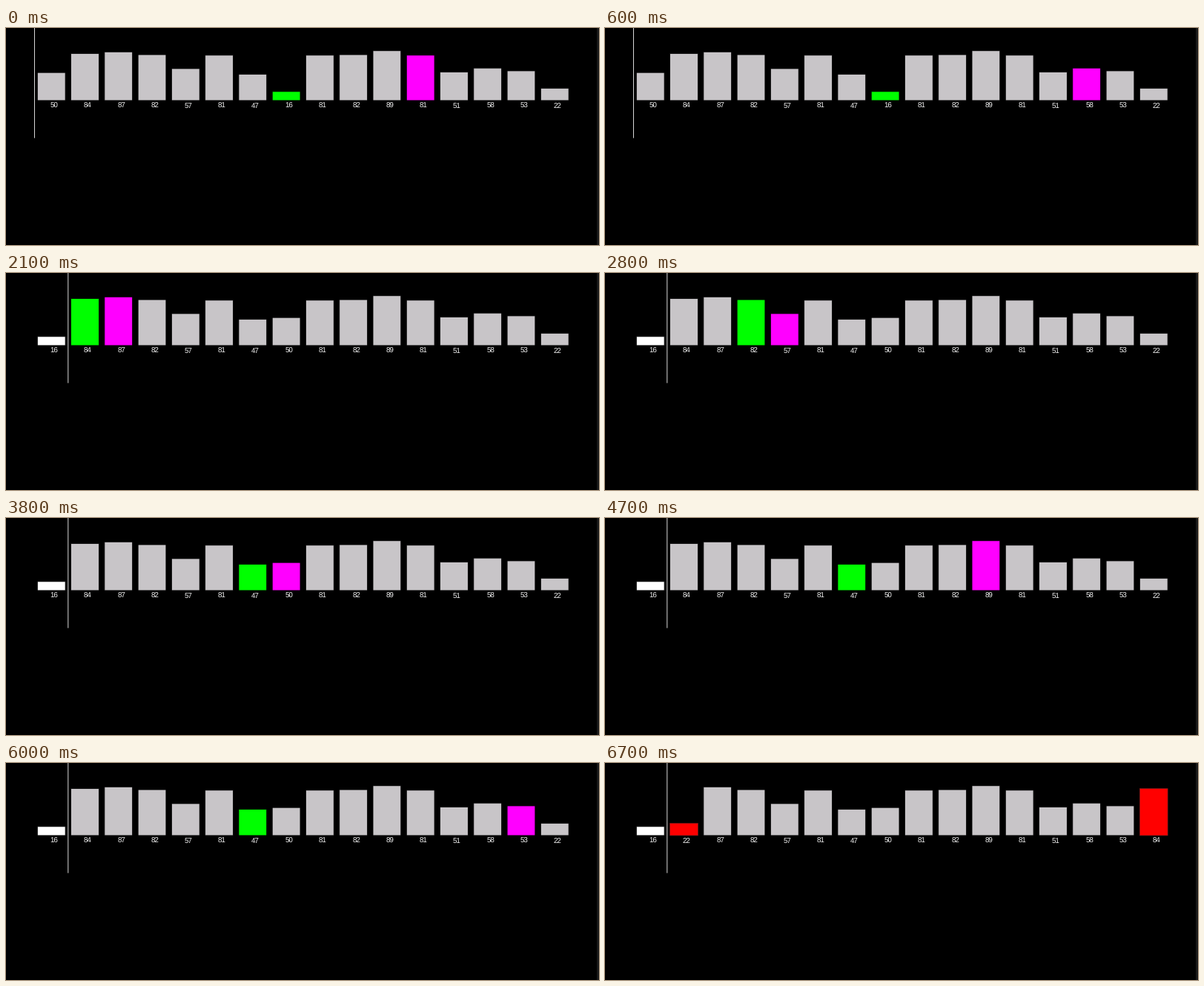
A matplotlib script for the animation above (6800 ms loop, 800 by 293 pixels).

```python
import matplotlib.pyplot as plt
from matplotlib.animation import FuncAnimation
from matplotlib.patches import Rectangle

plt.rcParams["text.hinting"] = "none"

WIDTH, HEIGHT, DPI = 800, 293, 100
STEP_MS, FRAMES = 100, 68
UNIT = 0.7545                    # pixels per drawing unit
LEFT, BASE = 42.35, 97.9
PITCH, BAR_WIDTH = 60 * UNIT, 50 * UNIT
DIVIDER_X = 38.1

START, TICK = -0.2, 3.28         # in frames; a tick is one comparison

GRAY, WHITE, OUTLINE = "#c8c5c8", "#ffffff", "#000000"
SMALLEST, SCANNED, SWAPPED = "#00ff00", "#ff00ff", "#ff0000"
SWAP_OUTLINE = "#7a1a1a"

VALUES = [50, 84, 87, 82, 57, 81, 47, 16, 81, 82, 89, 81, 51, 58, 53, 22]


def selection_sort(values, scan, smallest):
    """Yield (time, values, sorted count, colours by bar) for each change."""
    values, time, done = values[:], START, 0
    while done < len(values) - 1:
        while scan < len(values):
            yield time, values[:], done, {scan: SCANNED, smallest: SMALLEST}
            if values[scan] < values[smallest]:
                smallest = scan
                yield time + TICK / 2, values[:], done, {smallest: SMALLEST}
            time += TICK
            scan += 1
        values[done], values[smallest] = values[smallest], values[done]
        yield time, values[:], done, {done: SWAPPED, smallest: SWAPPED}
        time += TICK / 2
        done += 1
        scan = smallest = done


HISTORY = list(selection_sort(VALUES, scan=11, smallest=7))


def px(size):
    return size * 72 / DPI


fig = plt.figure(figsize=(WIDTH / DPI, HEIGHT / DPI), dpi=DPI, facecolor="black")
ax = fig.add_axes([0, 0, 1, 1])
ax.set_xlim(0, WIDTH)
ax.set_ylim(HEIGHT, 0)
ax.axis("off")

ax.add_patch(Rectangle((797, 0), 3, HEIGHT, color="#191919", lw=0))
divider = ax.add_patch(Rectangle((DIVIDER_X, 0), 0.9, 148.6, color="#f0f0f0",
                                 lw=0, snap=False))

bars, labels = [], []
for i in range(len(VALUES)):
    x = LEFT + i * PITCH
    bars.append(ax.add_patch(Rectangle((x, BASE), BAR_WIDTH, 0, snap=False,
                                       lw=px(UNIT))))
    labels.append(ax.text(x + 17.3, 107.9, "", color="#f4f4f4", ha="left",
                          va="baseline", family="Liberation Sans",
                          fontsize=px(13 * UNIT)))


def update(step):
    past = [entry for entry in HISTORY if round(entry[0]) <= step]
    _, values, done, marked = past[-1]
    for i, (bar, label) in enumerate(zip(bars, labels)):
        color = marked.get(i, WHITE if i < done else GRAY)
        bar.set_y(BASE - values[i] * UNIT)
        bar.set_height(values[i] * UNIT)
        bar.set_facecolor(color)
        bar.set_edgecolor(SWAP_OUTLINE if color == SWAPPED else OUTLINE)
        label.set_text(str(values[i]))
    divider.set_x(DIVIDER_X + done * PITCH)
    return [*bars, *labels, divider]


animation = FuncAnimation(fig, update, frames=FRAMES, interval=STEP_MS,
                          repeat=True, repeat_delay=0, blit=False)
plt.show()
```
